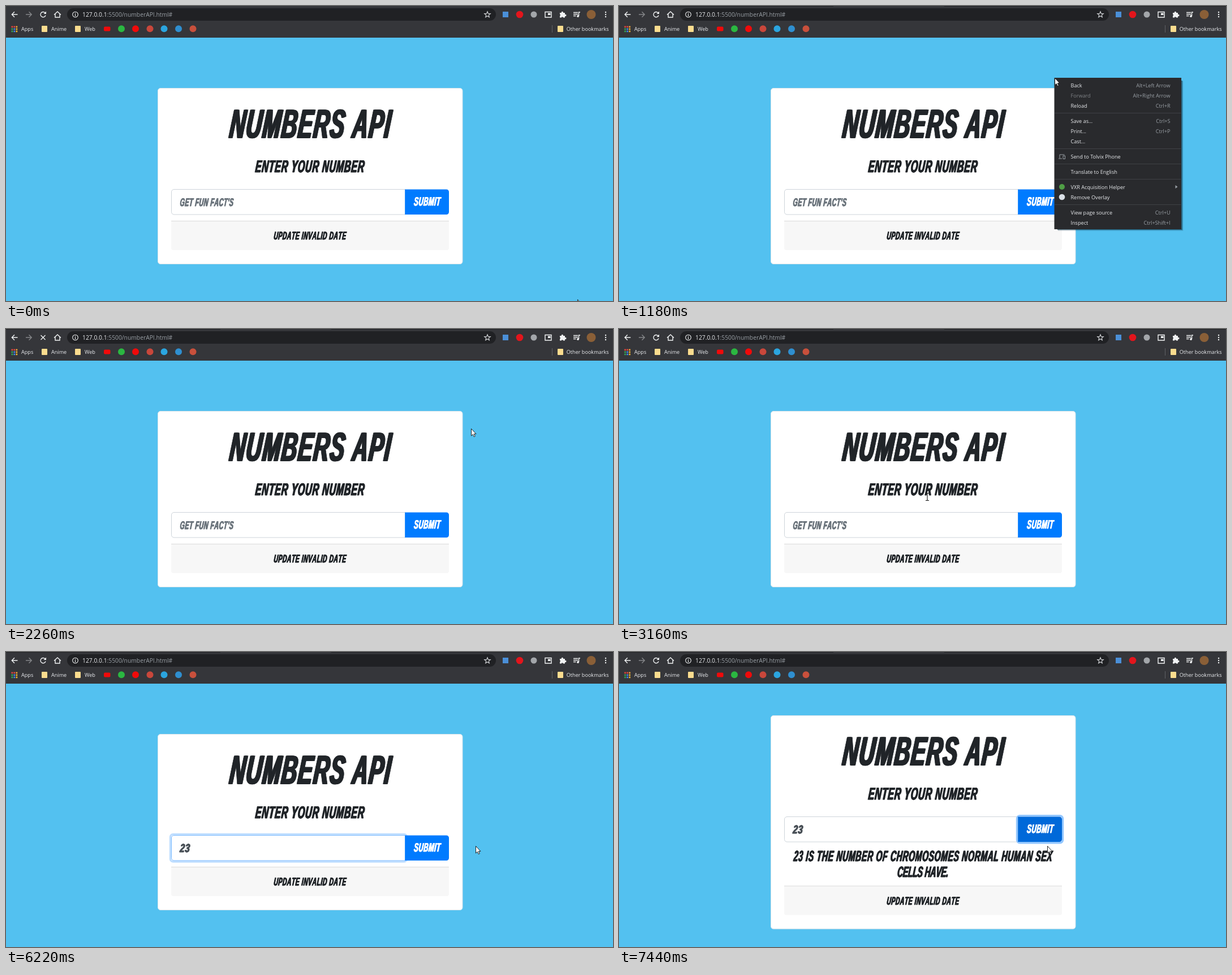
Write an HTML page that moves like this. It is 1073 by 522 pixels and loops after 8000 ms.

```html
<!DOCTYPE html>
<html lang="en">
<head>
<meta charset="utf-8">
<title>Numbers API</title>
<style>
  html, body { margin: 0; width: 100%; height: 100%; overflow: hidden; background: #53c1f0; }
  svg { display: block; width: 1073px; height: 522px; }
  text { white-space: pre; }
  .ui { font: 9.1px "Open Sans", "Noto Sans", sans-serif; fill: #e8eaed; }
  .url { font-size: 10.3px; }
  .dim { fill: #9aa0a6; }
  .off { fill: #7f8286; }
  .comic {
    font-family: "Liberation Sans", sans-serif; font-weight: bold; font-style: italic;
    font-kerning: none; fill: currentColor; stroke: currentColor; stroke-width: .018em;
    text-shadow: .027em 0 currentColor, -.027em 0 currentColor;
  }
  .line { fill: none; stroke: #f1f3f4; stroke-width: 1.4; }
</style>
</head>
<body>
<svg viewBox="0 0 1073 522" xmlns="http://www.w3.org/2000/svg">
  <rect width="1073" height="522" fill="#53c1f0"/>

  <g id="browser">
    <rect width="1073" height="56" fill="#35363a"/>
    <path id="tabs" d="M0 .5H379M575 .5H1073" stroke="#202124"/>
    <rect x="108" y="4" width="758" height="22" rx="11" fill="#202124"/>
    <path class="line" d="M20.500 15H10.500M15 10.300L10.300 15L15 19.700"/>
    <path class="line" d="M35 15H45M40.500 10.300L45.200 15L40.500 19.700" style="stroke:#85878a"/>
    <g id="reload">
      <path class="line" d="M69 12A4.600 4.600 0 1 0 70 16.500"/>
      <path d="M71 9.500V14H66.500Z" fill="#f1f3f4"/>
    </g>
    <path id="stop" class="line" d="M61.500 11L69.500 19M69.500 11L61.500 19"/>
    <path class="line" d="M85 15.500L91 10L97 15.500M87 14V20H95V14"/>
    <circle class="line" cx="122.500" cy="15" r="4.800" style="stroke-width:1.100"/>
    <path class="line" d="M122.500 14.300V18M122.500 12V13.200" style="stroke-width:1.200"/>
    <text class="ui url" x="135" y="18.700">127.0.0.1<tspan class="dim">:5500/numberAPI.html#</tspan></text>
    <path id="star" class="line" style="stroke:#d5d7da;stroke-width:1.100"/>

    <rect x="878" y="10" width="10" height="10" fill="#4a8fd8"/>
    <circle cx="908" cy="15" r="6.300" fill="#e3151c"/>
    <circle cx="933" cy="15" r="5.500" fill="#a3a6aa"/>
    <path d="M953 10.500H964V20H953Z" class="line"/>
    <rect x="958" y="12.500" width="4.500" height="3.500" fill="#f1f3f4"/>
    <path d="M979 12H981.800A1.700 1.700 0 1 1 985 12H988V15A1.700 1.700 0 1 1 988 18V20.500H985A1.700 1.700 0 0 0 981.800 20.500H979V17.600A1.700 1.700 0 0 0 979 14.600Z" fill="#f1f3f4"/>
    <path class="line" d="M1003 11.500H1011M1003 14.500H1011M1003 17.500H1007.500M1012.500 18V11H1015"/>
    <circle cx="1011" cy="18" r="1.900" fill="#f1f3f4"/>
    <circle cx="1034.500" cy="15" r="8" fill="#8a5f37"/>
    <g id="dots" fill="#f1f3f4"></g>

    <g id="apps"></g>
    <g id="folders" fill="#fbdc8e"></g>
    <text class="ui" x="27" y="43.600">Apps</text>
    <text class="ui" x="80" y="43.600">Anime</text>
    <text class="ui" x="139" y="43.600">Web</text>
    <text class="ui" x="1065.500" y="43.600" text-anchor="end">Other bookmarks</text>
    <path d="M965.500 34V47" stroke="#5f6165"/>
    <rect x="173" y="36.500" width="11.500" height="8" rx="2" fill="#f00a0a"/>
    <g id="marks"></g>
  </g>

  <rect id="card" x="268.500" width="538.500" rx="4.500" fill="#fff" stroke="#d5e2ea"/>
  <g id="top" color="#212529">
    <g id="heads"></g>
    <rect id="ring" x="290.500" y="322.500" width="418" height="48.500" rx="5" fill="none" stroke="#bfdeff" stroke-width="3.500"/>
    <path id="field" d="M706 324.500H297A4.500 4.500 0 0 0 292.500 329V364.500A4.500 4.500 0 0 0 297 369H706Z" fill="#fff"/>
    <rect id="glow" x="703.500" y="322.700" width="81" height="48" rx="5" fill="none" stroke="#93c7ff" stroke-width="3.400"/>
    <path id="button" d="M705.200 324.500H778.500A4.500 4.500 0 0 1 783 329V364.500A4.500 4.500 0 0 1 778.500 369H705.200Z"/>
    <rect id="caret" y="337" width="1" height="20" fill="#222"/>
    <g id="labels"></g>
  </g>
  <g id="fact" color="#212529"></g>
  <g id="foot" color="#212529">
    <path d="M292 380.500H783V428A4 4 0 0 1 779 432H296A4 4 0 0 1 292 428Z" fill="#f7f7f7"/>
    <path d="M292 380.500H783" stroke="#dadada"/>
  </g>

  <g id="shade" fill="none" stroke="#123a4c">
    <path d="M775 395.500H995V132" stroke-opacity=".75" stroke-width="1.600"/>
    <path d="M776 397H996.500V133" stroke-opacity=".22" stroke-width="1.500"/>
  </g>
  <g id="menu">
    <rect x="769.500" y="127" width="224.500" height="268" fill="#292a2d"/>
    <rect id="hover" x="770" width="223.500" height="18.500" fill="#4b4c4f"/>
    <g id="items"></g>
    <path class="line" d="M779 269V263H787.500M777 270H783M785 265H788.500V270.500H785Z" style="stroke:#9aa0a6;stroke-width:1"/>
    <circle cx="783" cy="320" r="5" fill="#4f9e45"/>
    <circle cx="783" cy="338" r="5.300" fill="#d9dfe6"/>
    <path d="M983.500 317L987.500 320L983.500 323Z" fill="#9aa0a6"/>
  </g>

  <g id="cursor">
    <path id="arrow" d="M.5 .5V13L3.300 10.400L5.200 14.700L7.200 13.800L5.300 9.700H9Z" fill="#fff" stroke="#111" stroke-width=".9"/>
    <path id="beam" d="M-3 -6.500H-.8L0 -5.700L.8 -6.500H3M0 -5.700V5.700M-3 6.500H-.8L0 5.700L.8 6.500H3" fill="none" stroke="#111" stroke-width="1.100"/>
    <path id="hand" d="M-1 1Q0 -.6 1.100 1V5L6.500 6.200Q7.800 6.600 7.600 8L6.500 14H.5L-3.600 8.600Q-3 7 -1 8.600Z" fill="#fff" stroke="#111" stroke-width=".9"/>
  </g>
</svg>
<script>
const LOOP = 8000;
const $ = id => document.getElementById(id);

function add(parent, tag, attrs, text) {
  const el = document.createElementNS("http://www.w3.org/2000/svg", tag);
  for (const key in attrs) el.setAttribute(key, attrs[key]);
  if (text) el.textContent = text;
  $(parent).appendChild(el);
  return el;
}

// Slanted, condensed display lettering
function comic(parent, text, x, y, size, { anchor = "middle", color = "currentColor", narrow = .53, gap = .055 } = {}) {
  return add(parent, "text", {
    class: "comic", "font-size": size, "text-anchor": anchor, color,
    "letter-spacing": gap * size,
    transform: `translate(${x} ${y}) skewX(-6) scale(${narrow} 1)`
  }, text);
}

const left = { anchor: "start" };
comic("heads", "NUMBERS API", 536.7, 232.5, 71);
comic("heads", "ENTER YOUR NUMBER", 536.7, 294, 30);
const hint = comic("labels", "GET FUN FACT'S", 307, 353.7, 19.9, { ...left, color: "#6c757d" });
const typed = comic("labels", "23", 307, 353.7, 20.5, { ...left, color: "#495057", narrow: .72 });
comic("labels", "SUBMIT", 744.3, 353.3, 21.4, { color: "#fff" });
comic("fact", "23 IS THE NUMBER OF CHROMOSOMES NORMAL HUMAN SEX", 537, 370, 26.2);
comic("fact", "CELLS HAVE.", 536.5, 398.3, 26.2, { gap: -.01 });
comic("foot", "UPDATE INVALID DATE", 537, 413, 19.5);

// Toolbar and bookmark icons
let star = "";
for (let i = 0; i < 10; i++) {
  const a = i * Math.PI / 5, r = i % 2 ? 2.4 : 5.6;
  star += (i ? "L" : "M") + (851 + r * Math.sin(a)).toFixed(2) + " " + (15.3 - r * Math.cos(a)).toFixed(2);
}
$("star").setAttribute("d", star + "Z");
for (const y of [11, 15, 19]) add("dots", "circle", { cx: 1060, cy: y, r: 1.2 });
["#e8453c", "#e8453c", "#f2a33a", "#34a853", "#4285f4", "#f2b52c", "#34a853", "#4285f4", "#f2b52c"].forEach((fill, i) =>
  add("apps", "rect", { x: 9.5 + i % 3 * 4, y: 35.5 + Math.floor(i / 3) * 4, width: 2.7, height: 2.7, fill }));
for (const x of [63, 122, 975]) add("folders", "rect", { x, y: 35, width: 10, height: 11, rx: 1 });
[[204, "#2bb741"], [229, "#f00a0a"], [254.5, "#c9473b"], [279.5, "#2ba5df"], [305, "#2f8fd0"], [330.5, "#c8503c"]]
  .forEach(([cx, fill]) => add("marks", "circle", { cx, cy: 40.3, r: 6, fill }));

// Context menu
const rows = [
  [144, "Back", "Alt+Left Arrow"], [162, "Forward", "Alt+Right Arrow", "off"], [180, "Reload", "Ctrl+R"],
  [207, "Save as...", "Ctrl+S"], [225, "Print...", "Ctrl+P"], [243, "Cast...", ""],
  [270, "Send to Tolvix Phone", ""], [297, "Translate to English", ""],
  [324, "VXR Acquisition Helper", ""], [342, "Remove Overlay", ""],
  [369, "View page source", "Ctrl+U"], [387, "Inspect", "Ctrl+Shift+I"]
];
const keys = rows.map(([y, label, key, tone = ""]) => {
  add("items", "text", { class: "ui " + tone, x: 798.5, y }, label);
  return add("items", "text", { class: "ui dim", x: 974.5, y, "text-anchor": "end" }, key);
});
for (const y of [189, 252, 279, 306, 351]) add("items", "path", { d: `M770 ${y}.5H993.500`, stroke: "#3f4145" });

// Pointer moves: first step, last step, steps, end x, end y
const moves = [
  [100, 840, 8, 724, 144], [960, 960, 1, 770, 127], [1390, 1610, 3, 822, 197],
  [1940, 2060, 2, 822, 176], [2600, 3157, 6, 545, 297], [3269, 3380, 2, 510, 314],
  [3480, 4250, 8, 397, 340], [5780, 6220, 5, 830, 343], [6330, 6440, 2, 811, 346],
  [6560, 6784, 3, 757, 343]
];

function pointer(t) {
  let x = 1010, y = 519;
  for (const [start, end, n, toX, toY] of moves) {
    if (t < start) break;
    const gap = (end - start) / (n - 1) || 1;
    const f = Math.min(n, Math.floor((t - start) / gap + 1e-6) + 1) / n;
    x += (toX - x) * f;
    y += (toY - y) * f;
  }
  return [x, y];
}

const show = (el, on) => el.setAttribute("visibility", on ? "visible" : "hidden");
const within = (v, a, b) => v >= a && v < b;

function draw(t) {
  const [x, y] = pointer(t);
  const done = t >= 7440;
  const grow = done ? 66.5 : 0, rise = Math.floor(grow / 2);
  const menuOpen = within(t, 1180, 2260);
  const focused = within(t, 4030, 7008), pressed = t >= 7008;

  $("card").setAttribute("y", 145.5 - rise);
  $("card").setAttribute("height", 311 + grow);
  $("top").setAttribute("transform", `translate(0 ${-rise})`);
  $("foot").setAttribute("transform", `translate(0 ${grow - rise})`);
  show($("fact"), done);

  const loading = within(t, 2260, 2600);
  show($("reload"), !loading);
  show($("stop"), loading);
  show($("tabs"), t >= 960);

  show($("shade"), within(t, 1060, 2260));
  show($("menu"), menuOpen);
  const row = rows.findIndex(r => within(y, r[0] - 13, r[0] + 5.5));
  const lit = menuOpen && row >= 0 && !rows[row][3] && y > 128;
  show($("hover"), lit);
  if (lit) $("hover").setAttribute("y", rows[row][0] - 13);
  keys.forEach((key, i) => key.style.fill = lit && i === row ? "#e8eaed" : "");

  show($("ring"), focused);
  show($("glow"), pressed);
  $("field").setAttribute("stroke", focused ? "#80bdff" : "#ced4da");
  show(hint, t < 5350);
  show(typed, t >= 5350);
  typed.textContent = t < 5670 ? "2" : "23";

  const count = t < 5350 ? 0 : t < 5670 ? 1 : 2;
  const since = [4030, 5350, 5670][count];
  show($("caret"), focused && Math.floor((t - since) / 550) % 2 === 0);
  $("caret").setAttribute("x", [307, 317, 327][count]);

  const onButton = within(x, 706, 783) && within(y + rise, 325, 369);
  const down = within(t, 7008, 7120);
  $("button").setAttribute("fill", down ? "#0062cc" : onButton || done ? "#0069d9" : "#007bff");

  const onText = !menuOpen && !done && (
    within(x, 292, 706) && within(y, 325, 369) ||
    within(x, 292, 783) && (within(y, 175, 240) || within(y, 268, 300)));
  show($("hand"), onButton);
  show($("beam"), onText && !onButton && !within(t, 5350, 5780));
  show($("arrow"), !onText && !onButton);
  $("cursor").setAttribute("transform", `translate(${x.toFixed(1)} ${y.toFixed(1)})`);
}

let origin;
function tick(now) {
  origin ??= now;
  draw((now - origin) % LOOP);
  requestAnimationFrame(tick);
}
draw(0);
requestAnimationFrame(tick);
</script>
</body>
</html>
```
